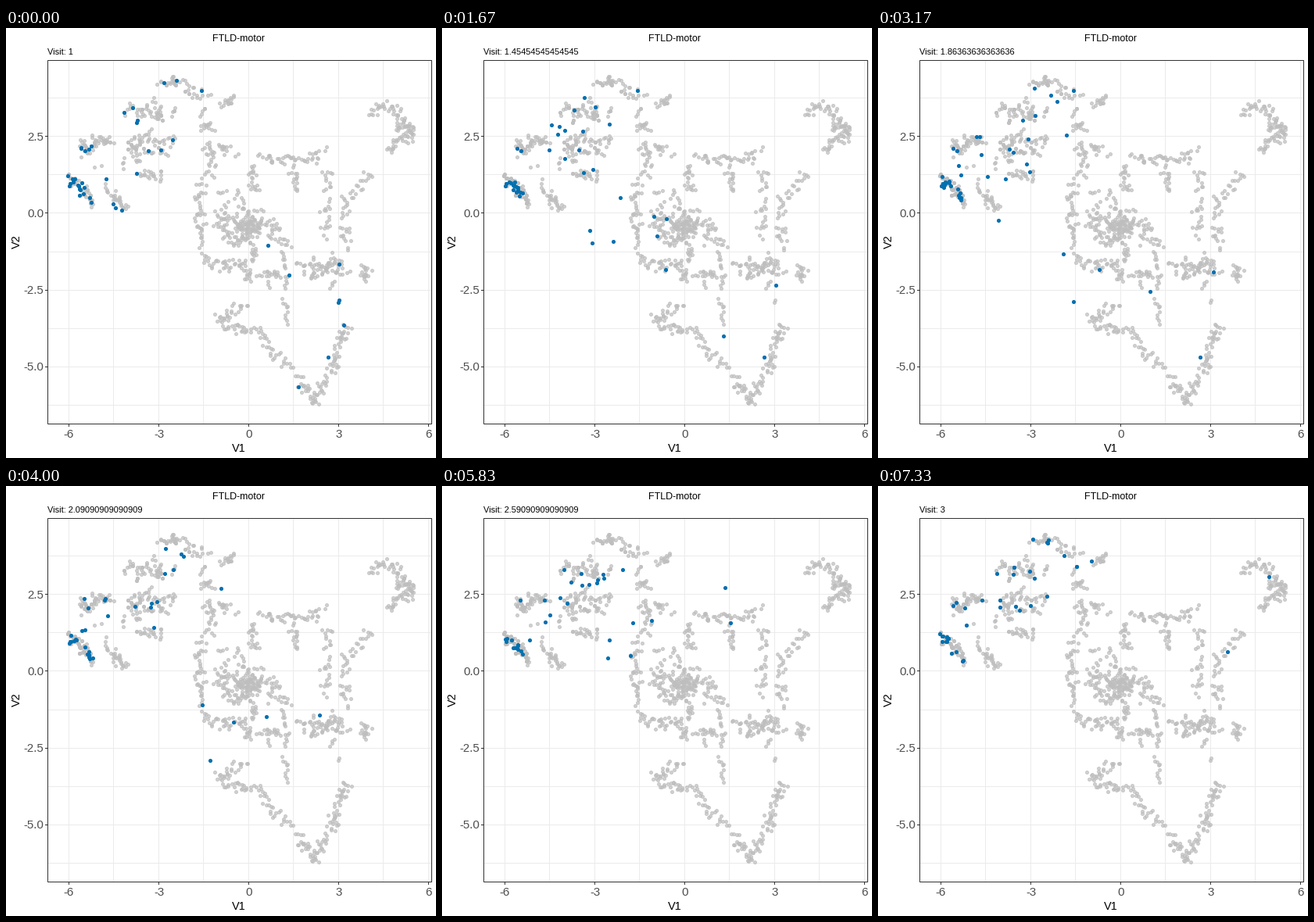
A matplotlib script that plays this animation: 550 px wide and 550 px high, repeating every 10000 ms.

```python
import numpy as np
import matplotlib.pyplot as plt
from matplotlib.animation import FuncAnimation
from matplotlib.patches import Rectangle

SIZE, DPI = 550, 100
TICKS, LOOP = 200, 10000
STEPS = 60                     # visible steps in one loop
HALF = 22                      # steps between two visits
PT = 72 / DPI
LEFT, RIGHT, TOP, BOTTOM = 53, 544, 41, 506
BLUE, GREY = "#0070b0", "#bebebe"

# Brushes for the background cloud: count, spread, then x, y pairs (pixels)
WEST = [
    (34, 5, 195, 72, 222, 66, 238, 82, 260, 86), (14, 5, 279, 97, 290, 95),
    (48, 17, 158, 118, 205, 104), (72, 19, 160, 158, 200, 145),
    (20, 4, 168, 187, 198, 190), (44, 6, 94, 163, 103, 147, 138, 144),
    (48, 3, 78, 188, 98, 207, 108, 223), (26, 5, 129, 204, 158, 236)]
EAST = [
    (42, 7, 255, 110, 262, 150, 254, 195), (14, 5, 265, 150, 294, 162),
    (40, 4, 248, 198, 249, 275), (200, 30, 280, 232, 322, 268),
    (66, 9, 258, 298, 345, 317), (20, 4, 312, 172, 318, 212),
    (46, 4, 323, 166, 362, 168, 411, 160), (14, 3, 367, 180, 372, 210),
    (30, 4, 411, 180, 410, 275), (34, 6, 357, 255, 360, 385),
    (72, 19, 388, 303, 425, 312), (42, 2, 467, 185, 432, 222, 436, 290),
    (18, 3, 461, 302, 457, 326)]
SOUTH = [
    (50, 5, 304, 354, 274, 366, 282, 381, 322, 385),
    (28, 4, 324, 388, 340, 415, 363, 434),
    (84, 3, 372, 446, 391, 478, 412, 445, 436, 376),
    (48, 3, 467, 110, 478, 99, 500, 106, 520, 138),
    (42, 6, 502, 120, 514, 138, 486, 155)]

# Subjects that cross the plot: x, y at visits 1, 2 and 3
TRAVELLERS = np.array([
    (373, 458, 344, 317, 215, 71), (425, 347, 429, 306, 110, 155),
    (431, 379, 110, 224, 112, 177), (136, 224, 252, 299, 237, 88),
    (127, 192, 269, 374, 172, 112), (147, 232, 304, 320, 151, 111),
    (424, 350, 95, 164, 197, 67), (425, 301, 121, 175, 217, 68),
    (361, 315, 162, 151, 499, 115), (334, 277, 99, 143, 99, 148),
    (217, 66, 111, 150, 272, 95), (139, 229, 257, 122, 446, 211)])
DROPOUT = (411, 420)           # seen at the first visit only


def brush(rng, n, spread, *path):
    """Short chains of points scattered around a polyline."""
    pts = np.array(path, float).reshape(-1, 2)
    run = np.r_[0, np.cumsum(np.hypot(*np.diff(pts, axis=0).T))]
    chains = -(-n // 4)
    at = (np.arange(chains) + rng.random(chains)) / chains * run[-1]
    seeds = np.c_[np.interp(at, run, pts[:, 0]), np.interp(at, run, pts[:, 1])]
    seeds += disc(rng, chains, spread)
    turn = rng.random(chains) * 2 * np.pi
    heading = np.c_[np.cos(turn), np.sin(turn)]
    steps = np.tile([-6, -2, 2, 6], chains)[:, None]
    chain = np.repeat(seeds, 4, 0) + steps * np.repeat(heading, 4, 0)
    return (chain + disc(rng, 4 * chains, 2))[:n]


def disc(rng, n, radius):
    angle = rng.random(n) * 2 * np.pi
    reach = radius * np.sqrt(rng.random(n))
    return np.c_[reach * np.cos(angle), reach * np.sin(angle)]


rng = np.random.default_rng(4)
cloud = np.vstack([brush(rng, *b) for b in WEST + EAST + SOUTH])
x, y = cloud.T
home = cloud[(x < 114) & (y > 182)]
head = cloud[(x < 255) & (y < 195)]


def pick(area, n):
    return rng.choice(area, n, replace=False)


# Most subjects stay near home or wander about the head of the cloud
visits = [np.vstack([TRAVELLERS[:, 2 * i:2 * i + 2], pick(home, 13),
                     pick(head, 12)]) for i in range(3)]
first_only = np.vstack([pick(home, 3), pick(head, 3), DROPOUT])
last_only = pick(head, 4)
cloud = np.vstack([cloud, *visits, DROPOUT])


def positions(step):
    """Subject positions, moving linearly from visit to visit."""
    leg, t = divmod(min(step / HALF, 2), 1)
    if leg == 2:
        return np.vstack([visits[2], last_only])
    a, b = visits[int(leg):int(leg) + 2]
    now = a + (b - a) * t
    return np.vstack([now, first_only]) if leg == 0 else now


plt.rcParams["font.family"] = "Liberation Sans"
fig = plt.figure(figsize=(SIZE / DPI, SIZE / DPI), dpi=DPI, facecolor="white")
ax = fig.add_axes([0, 0, 1, 1])
ax.set_xlim(0, SIZE)
ax.set_ylim(SIZE, 0)
ax.axis("off")


def line(xs, ys, color):
    ax.plot(xs, ys, color=color, lw=PT, zorder=1, snap=False,
            solid_capstyle="butt")


def label(x, y, text, px, color="black", **kw):
    return ax.text(x, y, text, fontsize=px * PT, color=color, zorder=6, **kw)


def dots(pts, color, alpha, z):
    return ax.plot(*(pts.T + 0.5), "o", ms=4.1 * PT, mew=0.95 * PT,
                   color=color, alpha=alpha, zorder=z)[0]


def to_x(v):
    return np.floor(310.4 + 38.35 * v) + 0.5


def to_y(v):
    return np.floor(236.9 - 39.3 * v) + 0.5


for v in np.arange(-6, 6.1, 1.5):
    line([to_x(v)] * 2, [TOP, BOTTOM], "#ebebeb")
for v in np.arange(-6.25, 3.8, 1.25):
    line([LEFT, RIGHT], [to_y(v)] * 2, "#ebebeb")

for v in range(-6, 7, 3):
    line([to_x(v)] * 2, [BOTTOM, BOTTOM + 4], "#333333")
    label(to_x(v), 524, str(v), 15, "#4d4d4d", ha="center")
for v in (2.5, 0, -2.5, -5):
    line([LEFT - 3, LEFT], [to_y(v)] * 2, "#333333")
    label(48.5, to_y(v) + 5, f"{v:.1f}", 15, "#4d4d4d", ha="right")

ax.add_patch(Rectangle((LEFT + 0.5, TOP + 0.5), RIGHT - LEFT, BOTTOM - TOP,
                       fill=False, ec="#333333", lw=PT, zorder=5, snap=False))
label(297.5, 17, "FTLD-motor", 12.5, ha="center")
label(297.5, 542, "V1", 14.5, ha="center")
label(14, 273.5, "V2", 14.5, ha="center", va="center", rotation=90)

dots(cloud, GREY, 0.72, 3)
subjects = dots(positions(0), BLUE, 1, 4)
visit = label(53, 34, "", 11)


def draw(tick):
    step = int(tick * STEPS / TICKS + 0.2)   # snap to the nearest tick
    subjects.set_data(*(positions(step).T + 0.5))
    visit.set_text(f"Visit: {1 + min(step / HALF, 2):.15g}")
    return subjects, visit


anim = FuncAnimation(fig, draw, frames=TICKS, interval=LOOP // TICKS,
                     repeat=True, repeat_delay=0, blit=False)
plt.show()
```
